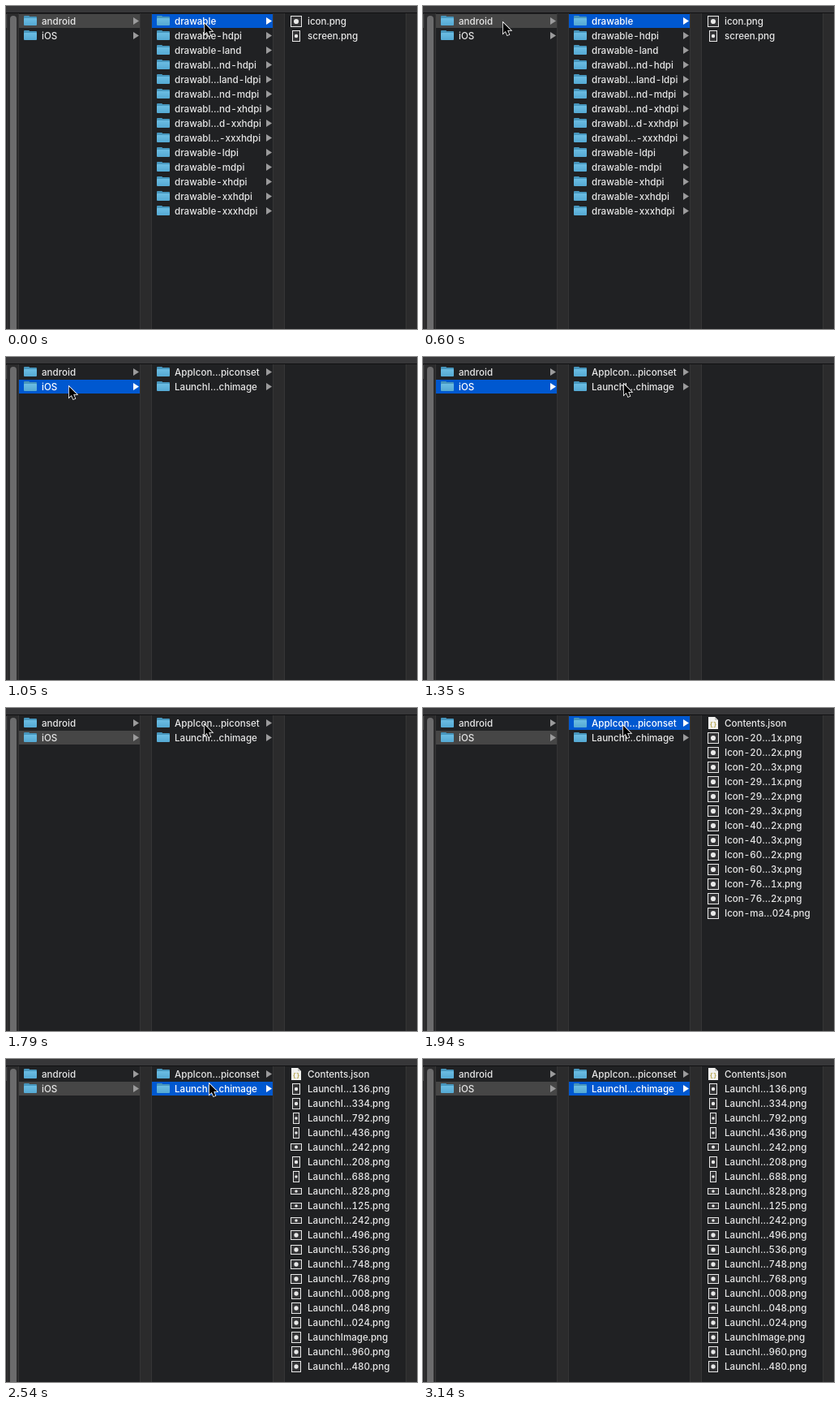
An HTML page with a canvas that plays this animation: 507x398 px, repeating every 3290 ms.

```html
<!DOCTYPE html>
<html lang="en">
<head>
<meta charset="utf-8">
<title>Column browser</title>
<style>
  html, body { margin: 0; width: 100%; height: 100%; overflow: hidden; background: #202123; }
  canvas, #labels, #pointer { position: absolute; left: 0; top: 0; }
  #labels {
    width: 507px; height: 398px; overflow: hidden; color: #e6e6e6;
    font: 500 11.6px/18px Inter, "Liberation Sans", sans-serif;
    font-variant-numeric: tabular-nums;
  }
  #labels span { position: absolute; white-space: pre; }
  #labels .active { color: #fff; }
</style>
</head>
<body>
<canvas id="stage" width="507" height="398"></canvas>
<div id="labels"></div>
<svg id="pointer" width="14" height="20" viewBox="-0.8 -1.4 14 20">
  <path d="M0 0V13.3L3 10.5L5.2 15.6L7.5 14.6L5.4 9.6H9.6Z"
    stroke="#fff" stroke-width="1.6" paint-order="stroke"/>
</svg>
<script>
const ctx = document.getElementById('stage').getContext('2d');
const labels = document.getElementById('labels');
const pointer = document.getElementById('pointer');
const LOOP = 3290;
const ROW = 18;
const TOP = 10;
const COLUMN_WIDTH = 149;
const GUTTER = 15;
const COLUMNS = [16, 180, 344];
const COLOR = {
  pane: '#202123', gutter: '#2b2b2c', edge: '#353536', active: '#0058d0',
  inactive: '#464646', arrow: '#9b9b9c', thumb: '#6b6b6c', paper: '#e8e8e8'
};

const platforms = ['android', 'iOS'];
const drawables = ['', '-hdpi', '-land', '…nd-hdpi', '…land-ldpi', '…nd-mdpi', '…nd-xhdpi',
  '…d-xxhdpi', '…-xxxhdpi', '-ldpi', '-mdpi', '-xhdpi', '-xxhdpi', '-xxxhdpi']
  .map(end => (end[0] === '…' ? 'drawabl' : 'drawable') + end);
const assetSets = ['AppIcon…piconset', 'LaunchI…chimage'];

// Thumbnail sizes by image proportion.
const SIZE = {
  square: [14, 14], phone: [10, 14], tall: [8, 14],
  wide: [14, 9], slim: [14, 8], tablet: [14, 12], page: [12, 14]
};
const image = (name, size) => ({ name, size: SIZE[size] });
const json = { name: 'Contents.json' };
const androidFiles = [image('icon.png', 'square'), image('screen.png', 'phone')];
const iconFiles = [json,
  ...['20…1', '20…2', '20…3', '29…1', '29…2', '29…3', '40…2', '40…3', '60…2', '60…3', '76…1', '76…2']
    .map(id => image(`Icon-${id}x.png`, 'square')),
  image('Icon-ma…024.png', 'square')];
const launchGroups = [
  ['phone', '136 334'], ['tall', '792 436'], ['wide', '242'], ['phone', '208'], ['tall', '688'],
  ['slim', '828 125 242'], ['tablet', '496 536 748 768'], ['page', '008 048 024 Image 960 480']
];
const launchFiles = [json, ...launchGroups.flatMap(([size, ids]) => ids.split(' ').map(id =>
  image(id === 'Image' ? 'LaunchImage.png' : `LaunchI…${id}.png`, size)))];

// Each state: start time, selected rows, focused column, folders and files.
const states = [
  { at: 0, picked: [0, 0], focus: 1, folders: drawables, files: androidFiles },
  { at: 900, picked: [1, 0], focus: 0, folders: drawables, files: androidFiles },
  { at: 1050, picked: [1, -1], focus: 0, folders: assetSets, files: [] },
  { at: 1790, picked: [1, -1], focus: 1, folders: assetSets, files: [] },
  { at: 1940, picked: [1, 0], focus: 1, folders: assetSets, files: iconFiles },
  { at: 2540, picked: [1, 1], focus: 1, folders: assetSets, files: launchFiles }
];

// The pointer jumps between sampled positions: time, x, y.
const stops = [
  [0, 244, 20], [150, 198, 21], [300, 154, 20], [450, 108, 17], [600, 98, 19],
  [750, 77, 35], [1200, 113, 37], [1350, 247, 32], [1650, 244, 19], [1940, 246, 20],
  [2090, 249, 23], [2240, 250, 27], [2540, 250, 29], [2690, 251, 31],
  [2840, 304, 97], [2990, 483, 354], [3140, -50, -50]
];

function rect(x, y, w, h, color) {
  ctx.fillStyle = color;
  ctx.fillRect(x, y, w, h);
}

function shape(points, color) {
  ctx.beginPath();
  points.forEach(([x, y]) => ctx.lineTo(x, y));
  ctx.closePath();
  ctx.fillStyle = color;
  ctx.fill();
}

function rounded(x, y, w, h, radius, color) {
  ctx.beginPath();
  ctx.roundRect(x, y, w, h, radius);
  ctx.fillStyle = color;
  ctx.fill();
}

function label(text, x, y, active) {
  const span = document.createElement('span');
  span.textContent = text;
  span.className = active ? 'active' : '';
  span.style.left = `${x}px`;
  span.style.top = `${y}px`;
  labels.append(span);
}

function folderIcon(x, y) {
  rounded(x, y + 2, 7, 5, 1, '#4796bd');
  rounded(x, y + 3, 16, 5, 1, '#4796bd');
  const shade = ctx.createLinearGradient(0, y + 5, 0, y + 14);
  shade.addColorStop(0, '#6bbde3');
  shade.addColorStop(1, '#55a9d3');
  rounded(x, y + 5, 16, 9, 1, shade);
}

function imageIcon(x, y, [w, h]) {
  const left = Math.round(x - w / 2);
  const top = Math.round(y - h / 2);
  rect(left, top, w, h, COLOR.paper);
  rect(left + 1, top + 1, w - 2, h - 2, '#343436');
  ctx.beginPath();
  ctx.arc(left + w / 2, top + h / 2, Math.min(w, h) * 0.22, 0, Math.PI * 2);
  ctx.fillStyle = COLOR.paper;
  ctx.fill();
}

function jsonIcon(x, y) {
  shape([[x, y], [x + 8, y], [x + 12, y + 4], [x + 12, y + 15], [x, y + 15]], '#f2f2f0');
  shape([[x + 8, y], [x + 12, y + 4], [x + 8, y + 4]], '#c9c9c7');
  ctx.font = 'bold 7px "Liberation Mono", monospace';
  ctx.fillStyle = '#b1a044';
  ctx.fillText('{}', x + 1.8, y + 11);
}

function folderColumn(x, names, picked, focused) {
  names.forEach((name, i) => {
    const y = TOP + i * ROW;
    const active = i === picked && focused;
    if (i === picked) rect(x, y, COLUMN_WIDTH, ROW - 1, active ? COLOR.active : COLOR.inactive);
    folderIcon(x + 6, y);
    label(name, x + 28, y, active);
    shape([[x + 141, y + 4], [x + 148, y + 8.5], [x + 141, y + 13]],
      active ? '#fff' : COLOR.arrow);
  });
}

function fileColumn(x, files) {
  files.forEach(({ name, size }, i) => {
    const y = TOP + i * ROW;
    if (size) imageIcon(x + 14, y + 8.5, size);
    else jsonIcon(x + 8, y + 1);
    label(name, x + 28, y, false);
  });
}

function windowFrame() {
  rect(0, 0, 507, 398, COLOR.pane);
  rect(0, TOP, 1, ROW - 1, COLOR.inactive);
  rect(2, 9, 14, 389, COLOR.gutter);
  rect(1, 9, 1, 389, COLOR.edge);
  rect(15, 9, 1, 389, COLOR.edge);
  rounded(5, 12, 8, 400, 4, COLOR.thumb);
  COLUMNS.forEach(x => {
    const gutter = x + COLUMN_WIDTH;
    rect(gutter, 9, GUTTER, 389, COLOR.gutter);
    rect(gutter, 9, 1, 389, COLOR.edge);
    rect(gutter + GUTTER - 1, 9, 1, 389, COLOR.edge);
  });
  rect(0, 0, 507, 8, '#373739');
  rect(0, 8, 507, 1, '#111112');
}

function drawState({ picked, focus, folders, files }) {
  labels.replaceChildren();
  windowFrame();
  folderColumn(COLUMNS[0], platforms, picked[0], focus === 0);
  folderColumn(COLUMNS[1], folders, picked[1], focus === 1);
  fileColumn(COLUMNS[2], files);
}

let shown = null;
function render(now) {
  const time = now % LOOP;
  const state = states.findLast(s => s.at <= time);
  if (state !== shown) drawState(state);
  shown = state;
  const [, x, y] = stops.findLast(([at]) => at <= time);
  pointer.style.transform = `translate(${x}px, ${y}px)`;
}

const start = performance.now();
function tick() {
  render(performance.now() - start);
  requestAnimationFrame(tick);
}
tick();
</script>
</body>
</html>
```
